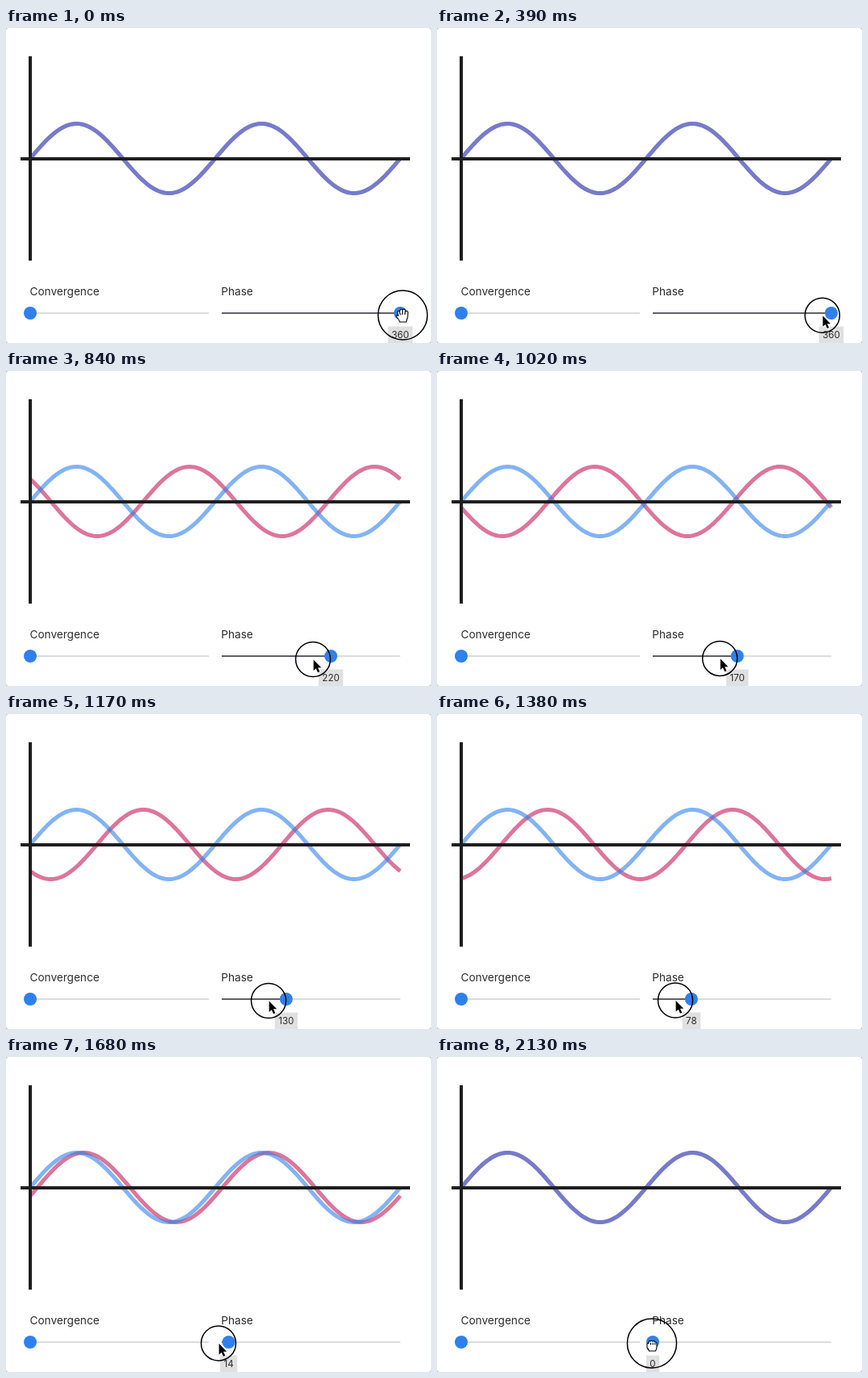
Animation, 526 px wide and 390 px high, one loop 2.22 s. Source, as an HTML page:

```html
<!DOCTYPE html>
<html lang="en">
<head>
<meta charset="utf-8">
<title>Phase slider</title>
<style>
  html, body { margin: 0; width: 100%; height: 100%; overflow: hidden; background: #c4c4c4; }
  svg { display: block; width: 526px; height: 390px; }
  text { font-family: Inter, Roboto, sans-serif; fill: #2b2b2b; }
  .label { font-size: 13.6px; }
  .value { font-size: 11.6px; text-anchor: middle; }
  .wave { fill: none; stroke-width: 5; stroke-opacity: .6; stroke-linejoin: round; }
  .axis { stroke: #1e1e1e; stroke-width: 4; }
  .track { stroke: #dcdcdc; stroke-width: 2; }
  .fill { stroke: #625f66; stroke-width: 2; }
  .knob { fill: #2f80ed; }
  .ring { fill: none; stroke: #000; stroke-width: 1.5; }
  .hand { fill: #fff; stroke: #000; stroke-width: 1.1; stroke-linejoin: round; stroke-linecap: round; }
  .arrow { fill: #000; stroke: #fff; stroke-width: 2; stroke-linejoin: round; paint-order: stroke; }
</style>
</head>
<body>
<svg viewBox="0 0 526 390">
  <rect width="526" height="390" rx="4" fill="#fff"/>
  <path id="pink" class="wave" stroke="#c61a57"/>
  <path id="blue" class="wave" stroke="#2f80ed"/>
  <path class="axis" d="M18 162H500M30 35V288"/>

  <text class="label" x="29.5" y="331">Convergence</text>
  <text class="label" x="266.3" y="331">Phase</text>

  <path class="track" d="M30 353H251M267 353H488"/>
  <circle class="knob" cx="30" cy="353" r="8"/>
  <path id="fill" class="fill"/>
  <rect id="box" y="369.5" height="20.5" fill="#e0e0e0"/>
  <text id="value" class="value" y="384"></text>
  <circle id="knob" class="knob" cy="353" r="8"/>

  <g id="pointer">
    <circle id="ring" class="ring"/>
    <path id="arrow" class="arrow" d="M.6 .4V14L3.7 11.2 6 16.2 8.3 15.2 6 10.3H10.2Z"/>
    <path id="open" class="hand" d="M-3.5 8.5Q-5 5 -8 1.5Q-8 -.8 -5.5 .8L-6.5 -4Q-5.5 -6.5 -4 -4L-3 -6.5Q-1.5 -8.5 -.3 -6.5L.8 -7Q2.5 -8.2 3.2 -6L3.8 -4.6Q6 -6 6.5 -3.5L6 3Q5 5 4.5 8.5ZM-4 -4L-2.8 -.5M-.3 -6.5V-1M3.2 -6L2.9 -1"/>
    <path id="closed" class="hand" transform="translate(0 2.5)" d="M-6 -1Q-6 -3 -4 -2.6V-4Q-3.6 -6 -1.8 -5Q-.5 -6.6 1 -5Q3 -6 3.8 -4Q6 -4.4 6 -2V2Q6 4 4.5 7H-3.5Q-4 5 -6 3ZM-1.5 -3V-1M1.2 -3V-1M3.8 -2.6V-1"/>
  </g>
</svg>
<script>
const LOOP = 2220, STEP = 30, LAST = 2130;
const LAG = 130;            // the knob trails the pointer
const MIN = 267, MAX = 488; // slider travel

// [time, position]
const pointerX = [[0, 491], [240, 491], [330, 487.5], [420, 470], [500, 447.48], [630, 415],
  [710, 402.06], [840, 380], [1040, 346.8], [1170, 325], [1250, 314.88], [1380, 295],
  [1550, 275.6], [1680, 263], [1800, 261], [1950, 263], [2130, 266]];
const pointerY = [[0, 355.5], [300, 355.5], [630, 357], [840, 357], [1170, 355], [1380, 354.5], [2130, 354.5]];
const ringSize = [[0, 30.5], [240, 21.5], [1860, 21.5], [2130, 30.5]];

const $ = id => document.getElementById(id);
const set = (id, attrs) => {
  for (const name in attrs) $(id).setAttribute(name, attrs[name]);
};
const clamp = (v, lo, hi) => Math.min(hi, Math.max(lo, v));

function slope(keys, i) {
  const a = keys[Math.max(0, i - 1)], b = keys[Math.min(keys.length - 1, i + 1)];
  return (b[1] - a[1]) / (b[0] - a[0]);
}

// Cubic curve through the keys
function smooth(keys, t) {
  t = clamp(t, keys[0][0], keys[keys.length - 1][0]);
  let i = 0;
  while (i < keys.length - 2 && t > keys[i + 1][0]) i++;
  const [t0, a] = keys[i], [t1, b] = keys[i + 1];
  const d = t1 - t0, u = (t - t0) / d, v = 1 - u;
  return v * v * (1 + 2 * u) * a + u * u * (3 - 2 * u) * b
    + d * u * v * (v * slope(keys, i) - u * slope(keys, i + 1));
}

function linear(keys, t) {
  let i = 0;
  while (i < keys.length - 2 && t > keys[i + 1][0]) i++;
  const [t0, a] = keys[i], [t1, b] = keys[i + 1];
  return a + (b - a) * clamp((t - t0) / (t1 - t0), 0, 1);
}

function wave(phase) {
  const points = [];
  for (let x = 30; x <= 488; x += 2) {
    const angle = (x - 30) / 229 * 2 * Math.PI - phase * Math.PI / 180;
    points.push(x + " " + (161.5 - 43 * Math.sin(angle)).toFixed(2));
  }
  return "M" + points.join("L");
}

function draw(t) {
  const x = smooth(pointerX, t), y = smooth(pointerY, t);
  const knob = clamp(smooth(pointerX, t - LAG), MIN, MAX);
  const phase = Math.round((knob - MIN) / (MAX - MIN) * 360);

  set("pink", { d: wave(phase) });
  set("fill", { d: `M${MIN} 353H${knob}` });
  set("knob", { cx: knob });

  $("value").textContent = phase;
  set("value", { x: knob });
  const width = $("value").getComputedTextLength() + 9;
  set("box", { x: knob - width / 2, width });

  const over = Math.abs(x - knob) < 9;
  const cursor = !over ? "arrow" : t < 90 ? "open" : "closed";
  for (const id of ["arrow", "open", "closed"]) {
    set(id, { visibility: id === cursor ? "visible" : "hidden" });
  }
  set("ring", { r: linear(ringSize, t) });
  set("pointer", { transform: `translate(${x} ${y})` });
}

set("blue", { d: wave(0) });
const start = performance.now();
function tick() {
  const t = (performance.now() - start) % LOOP;
  draw(Math.min(LAST, Math.floor(t / STEP) * STEP));
  requestAnimationFrame(tick);
}
tick();
</script>
</body>
</html>
```
